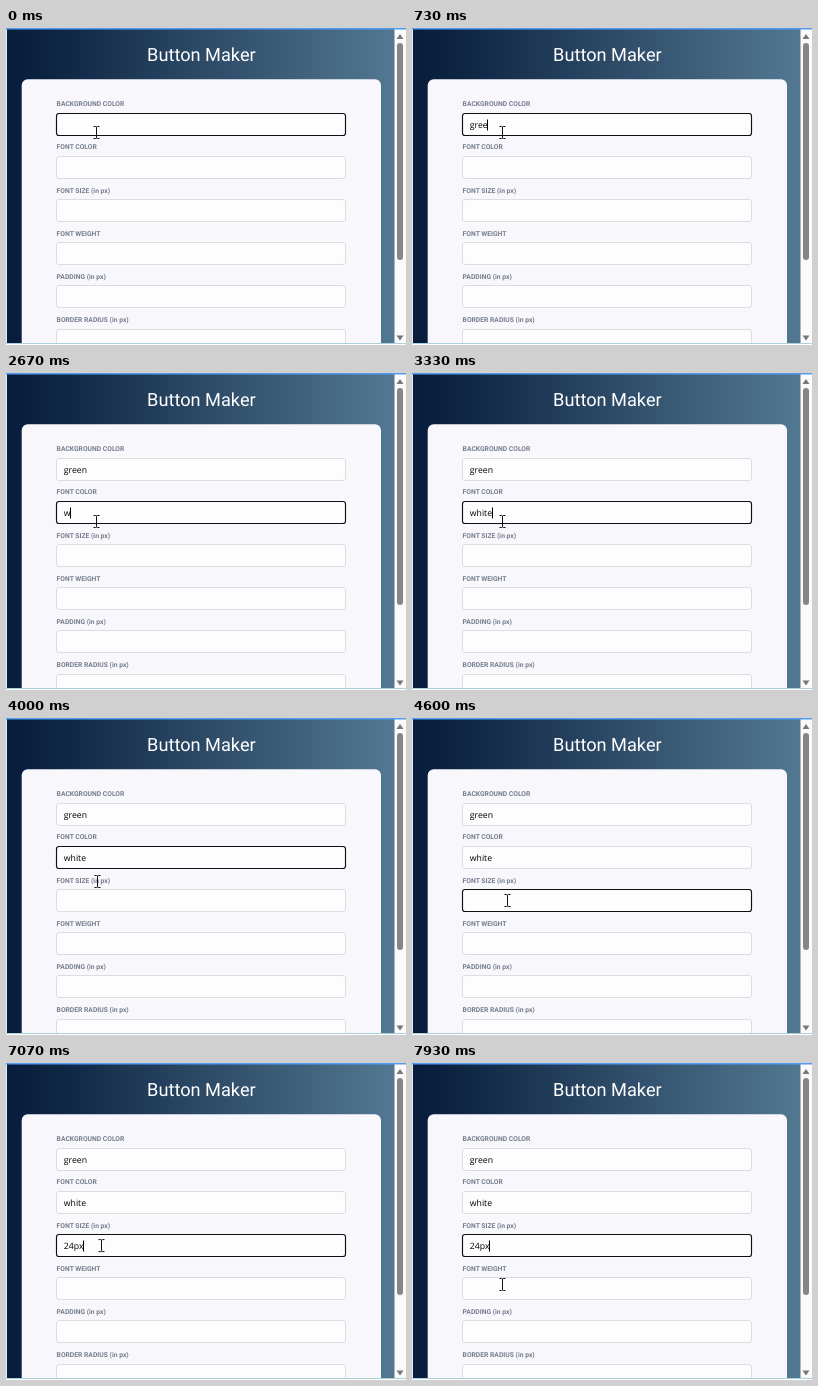
Animation of 400 by 317 pixels, one loop 8000 ms. Source, as an HTML page:

```html
<!DOCTYPE html>
<html lang="en">
<head>
<meta charset="utf-8">
<title>Button Maker</title>
<style>
  html, body { margin: 0; width: 100%; height: 100%; overflow: hidden; background: #fff; }
  svg { display: block; }
  text { font-family: Roboto, sans-serif; text-rendering: geometricPrecision; }
  .title { font-size: 18.2px; fill: #fff; }
  .label { font-size: 6.75px; font-weight: 700; fill: #757e8c; }
  .value { font-family: "Open Sans", "Noto Sans", sans-serif; font-size: 8.7px; fill: #000; }
  .field { fill: #fdfdfe; stroke: #dcdde3; stroke-width: 1; }
  .field.focus { stroke: #101014; stroke-width: 1.15; }
  .caret { stroke: #000; stroke-width: 1; }
  .pointer { fill: none; stroke: #111; stroke-width: 1; }
</style>
</head>
<body>
<svg width="400" height="317" viewBox="0 0 400 317">
  <defs>
    <linearGradient id="sky">
      <stop offset="0" stop-color="#081c3c"/>
      <stop offset=".12" stop-color="#0d2443"/>
      <stop offset=".5" stop-color="#2c4966"/>
      <stop offset="1" stop-color="#537892"/>
    </linearGradient>
    <clipPath id="page"><rect width="400" height="315"/></clipPath>
  </defs>
  <g clip-path="url(#page)">
    <rect width="389" height="315" fill="url(#sky)"/>
    <text class="title" x="195.4" y="32.7" text-anchor="middle">Button Maker</text>
    <rect x="15.7" y="51.3" width="359.3" height="290" rx="6" fill="#f8f7fc"/>
    <g id="form"></g>
    <rect x="388.5" width="11.5" height="315" fill="#fafafa"/>
    <rect x="391" y="15" width="6" height="217" rx="3" fill="#868686"/>
    <path d="M390.5 10.5L394 5.5L397.5 10.5ZM390.5 307L394 312L397.5 307Z"
          transform="translate(0 .5)" fill="#777"/>
    <rect width="1" height="315" fill="#e3ecf5"/>
    <rect width="400" height="1.5" fill="#529cf0"/>
  </g>
  <rect y="315" width="400" height="1" fill="#acd0d8"/>
  <path id="pointer" class="pointer" d="M-3 -6H-1Q0 -6 0 -5Q0 -6 1 -6H3M0 -5V5M-3 6H-1Q0 6 0 5Q0 6 1 6H3"/>
</svg>
<script>
const LOOP = 8000, BLINK = 530, PITCH = 43.1;
const labels = ['BACKGROUND COLOR', 'FONT COLOR', 'FONT SIZE (in px)',
                'FONT WEIGHT', 'PADDING (in px)', 'BORDER RADIUS (in px)'];

// Each entry: when the field gains focus, what is typed, and when each key lands.
const entries = [
  { focus: -600, text: 'green', keys: [250, 400, 540, 700, 850] },
  { focus: 2000, text: 'white', keys: [2600, 2760, 2920, 3080, 3250] },
  { focus: 4065, text: '24px', keys: [5650, 5850, 6450, 6700] }
];

// Pointer stops: time, x, y
const stops = [
  [0, 90.5, 104.5], [950, 90.5, 104.5], [1450, 90.5, 140.5], [2050, 90.5, 140.5], [2400, 90.5, 148.5],
  [3500, 90.5, 148.5], [4000, 91.5, 163.5], [4200, 95.5, 182.5], [7050, 95.5, 182.5], [7750, 90.5, 221.5]
];

const form = document.getElementById('form');
const pointer = document.getElementById('pointer');

function add(name, attrs, text = '') {
  const node = document.createElementNS('http://www.w3.org/2000/svg', name);
  for (const key in attrs) node.setAttribute(key, attrs[key]);
  node.textContent = text;
  return form.appendChild(node);
}

const fields = labels.map((label, i) => {
  const top = Math.round(85 + i * PITCH) + .5;
  add('text', { class: 'label', x: 50.6, y: 78.3 + i * PITCH }, label);
  return {
    baseline: top + 14.5,
    box: add('rect', { class: 'field', x: 50.5, y: top, width: 289, height: 22, rx: 2.5 }),
    value: add('text', { class: 'value', x: 57.8, y: top + 14.5 })
  };
});
const caret = add('path', { class: 'caret', d: 'M0 -8.5V2.5' });

function pointerAt(t) {
  const next = stops.findIndex(stop => stop[0] > t);
  if (next < 0) return stops.at(-1).slice(1);
  const [t0, x0, y0] = stops[next - 1], [t1, x1, y1] = stops[next];
  const u = (t - t0) / (t1 - t0), ease = u * u * (3 - 2 * u);
  return [x0 + (x1 - x0) * ease, y0 + (y1 - y0) * ease];
}

function draw(t) {
  const active = entries.findLastIndex(entry => entry.focus <= t);
  fields.forEach(({ box, value }, i) => {
    const entry = entries[i];
    box.classList.toggle('focus', i === active);
    value.textContent = entry ? entry.text.slice(0, entry.keys.filter(k => k <= t).length) : '';
  });

  const { focus, keys } = entries[active];
  const lastInput = Math.max(focus, ...keys.filter(k => k <= t));
  const visible = Math.floor((t - lastInput) / BLINK) % 2 === 0;
  const { value, baseline } = fields[active];
  const x = Math.floor(57.8 + value.getComputedTextLength()) + .5;
  caret.setAttribute('transform', `translate(${x} ${baseline})`);
  caret.setAttribute('visibility', visible ? 'visible' : 'hidden');

  pointer.setAttribute('transform', `translate(${pointerAt(t)})`);
}

const start = performance.now();
function tick() {
  draw((performance.now() - start) % LOOP);
  requestAnimationFrame(tick);
}
tick();
</script>
</body>
</html>
```
